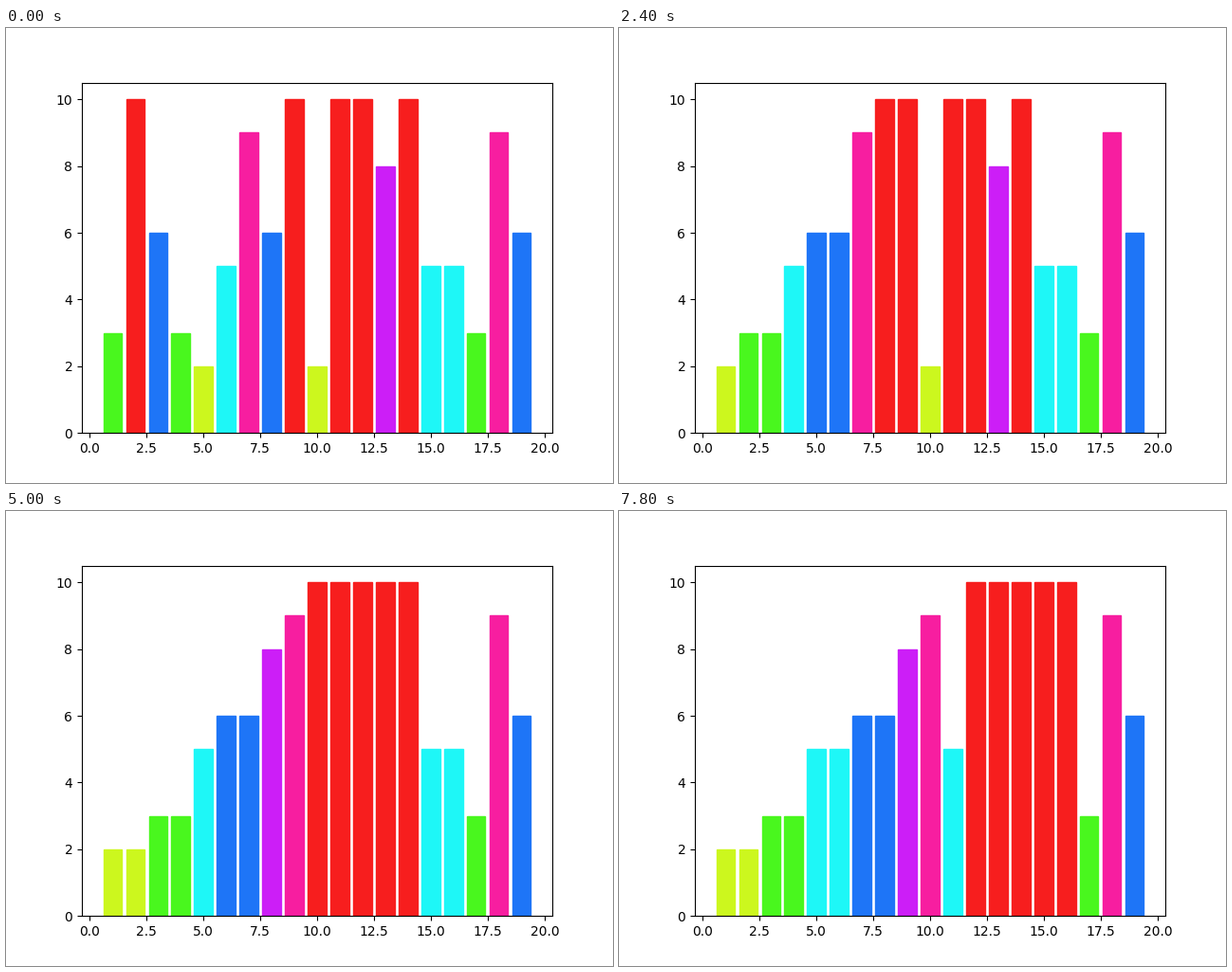
Write a matplotlib script that moves like this. It is 640 by 480 pixels and loops after 8000 ms.

```python
import colorsys

import matplotlib.pyplot as plt
from matplotlib.animation import FuncAnimation

FRAMES = 40
INTERVAL = 200
START = [3, 10, 6, 3, 2, 5, 9, 6, 10, 2, 10, 10, 8, 10, 5, 5, 3, 9, 6]


def insertion_steps(values):
    """Yield the list before sorting and after every adjacent swap."""
    vals = list(values)
    yield list(vals)
    for i in range(1, len(vals)):
        j = i
        while j > 0 and vals[j] < vals[j - 1]:
            vals[j - 1], vals[j] = vals[j], vals[j - 1]
            j -= 1
            yield list(vals)


def colour(value):
    return colorsys.hsv_to_rgb(value / 10 % 1, 0.88, 0.97)


steps = list(insertion_steps(START))[:FRAMES]

fig, ax = plt.subplots(figsize=(6.4, 4.8), dpi=100)
bars = ax.bar(range(1, len(START) + 1), START)


def draw(frame):
    for bar, value in zip(bars, steps[frame]):
        bar.set_height(value)
        bar.set_color(colour(value))
    return list(bars)


def init():
    return draw(0)


anim = FuncAnimation(fig, draw, frames=FRAMES, init_func=init,
                     interval=INTERVAL, repeat=True, repeat_delay=0)
plt.show()
```
